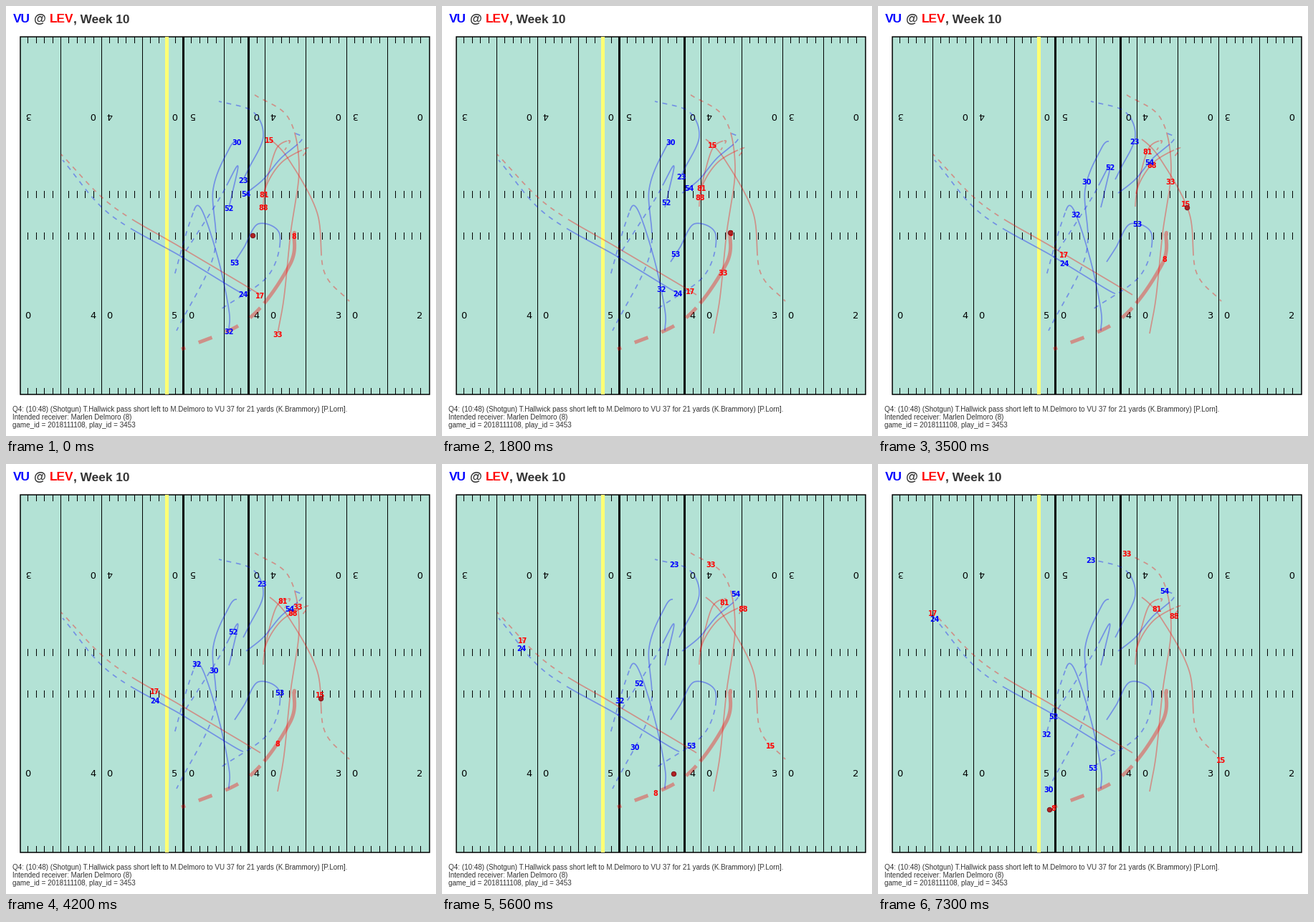
A matplotlib script for the animation above (7400 ms loop, 600 by 600 pixels).

```python
import numpy as np
import matplotlib.pyplot as plt
from matplotlib.animation import FuncAnimation

FRAMES, STEP = 74, 100
SNAP, THROW, LAST = 11, 46, 63   # play starts, routes turn dashed, play ends
LEAD = 0.8                       # frames by which the ball leads its carrier
PX = 0.72                        # points per pixel at 100 dpi
BLUE, RED, GREY = "#0000ff", "#ff0000", "#333333"
LEFT, RIGHT, TOP, BOTTOM = 19.5, 590.5, 43, 542
YARD = 11.4

fig = plt.figure(figsize=(6, 6), dpi=100, facecolor="white")
ax = fig.add_axes([0, 0, 1, 1])
ax.set_xlim(0, 600)
ax.set_ylim(600, 0)
ax.axis("off")


def write(x, y, s, size, color=GREY, font="Liberation Sans", **kw):
    return ax.text(x, y, s, fontsize=size * PX, color=color, family=font, **kw)


def digit(x, y, s, size, turned=False, **kw):
    shift = -0.365 * size if turned else 0.365 * size
    return write(x, y + shift, s, size, font="DejaVu Sans", ha="center",
                 va="baseline", rotation=180 if turned else 0,
                 rotation_mode="anchor", **kw)


def bars(xs, y0, y1, width=1, color="black", z=2):
    """Vertical bars centred on whole pixel columns."""
    ax.vlines(np.floor(xs) + 0.5, y0, y1, colors=color, linewidth=width * PX,
              zorder=z, snap=False)


def draw_field():
    ax.add_patch(plt.Rectangle((LEFT, TOP), RIGHT - LEFT, BOTTOM - TOP,
                               fc="#b3e2d5", ec="black", lw=1.5 * PX, zorder=1))
    marks = np.arange(1, 50)
    bars(LEFT + YARD * marks[marks % 5 == 0], TOP, BOTTOM)
    for y0, y1 in ((TOP, 52), (258, 268), (316, 326), (533, BOTTOM)):
        bars(LEFT + YARD * marks[marks % 5 > 0], y0, y1)
    bars([224], TOP, BOTTOM, 5, "#ffff73", 3)
    bars([247, 338], TOP, BOTTOM, 3, z=3)

    for k, tens in enumerate("345432"):
        mid = LEFT + 10 * YARD * k
        for x, low, high in ((mid - 12, tens, "0"), (mid + 11, "0", tens)):
            if LEFT < x < RIGHT:
                digit(x, 431, low, 13, color="black", zorder=4)
                digit(x, 153.5, high, 13, True, color="black", zorder=4)


def draw_text():
    for x, s, color in ((9.5, "VU", BLUE), (38.5, "@", GREY),
                        (61, "LEV", RED), (94.5, ", Week 10", GREY)):
        write(x, 23, s, 17.3, color, weight="bold")
    lines = ("Q4: (10:48) (Shotgun) T.Hallwick pass short left to M.Delmoro "
             "to VU 37 for 21 yards (K.Brammory) [P.Lorn].",
             "Intended receiver: Marlen Delmoro (8)",
             "game_id = 2018111108, play_id = 3453")
    for i, s in enumerate(lines):
        write(9, 566.3 + 11 * i, s, 9.9)


class Runner:
    """Smooth run through evenly timed points, x + yj, up to the last moment."""

    def __init__(self, number, color, *points, start=SNAP, width=1.7):
        self.p = np.array(points)
        self.start = start
        self.slope = np.gradient(self.p)
        if start:                      # set players begin from rest
            self.slope[0] = 0
        for a, b, style in ((0, THROW, "-"), (THROW + 1, LAST, (0, (4, 4)))):
            z = self.at(np.linspace(a, b, 150))
            ax.plot(z.real, z.imag, color=color, alpha=0.36, lw=width * PX,
                    linestyle=style, solid_capstyle="butt",
                    dash_capstyle="butt", zorder=5)
        self.label = digit(0, 0, number, 9.6, color=color, weight="bold",
                           zorder=6)

    def at(self, t):
        n = len(self.p) - 1
        s = np.maximum(t - self.start, 0) * n / (LAST - self.start)
        i = np.minimum(np.floor(s).astype(int), n - 1)
        u = s - i
        ease = u * u * (3 - 2 * u)
        return (self.p[i] + ease * (self.p[i + 1] - self.p[i])
                + u * (1 - u) ** 2 * self.slope[i]
                - u * u * (1 - u) * self.slope[i + 1])

    def move(self, t):
        z = self.at(t)
        self.label.set_position((z.real, z.imag + 1 + 0.365 * 9.6))


draw_field()
draw_text()

receiver = Runner("8", RED, 402+320j, 402+319j, 396+361j, 338+437j, 245+479j,
                  width=5)
passer = Runner("15", RED, 368+186j, 393+212j, 434+288j, 444+371j, 479+412j)
back = Runner("33", RED, 379+457j, 388+406j, 397+318j, 409+225j, 394+156j,
              347+124j, start=0)
runners = [
    receiver, passer, back,
    Runner("81", RED, 360+262j, 365+239j, 378+198j, 396+188j, 389+201j),
    Runner("88", RED, 359+280j, 364+249j, 386+217j, 421+198j, 413+211j),
    Runner("17", RED, 355+403j, 327+386j, 246+338j, 147+278j, 77+207j),
    Runner("30", BLUE, 322+189j, 312+198j, 289+256j, 290+347j, 238+453j),
    Runner("23", BLUE, 331+242j, 339+226j, 359+182j, 344+147j, 297+133j),
    Runner("54", BLUE, 335+261j, 359+242j, 383+213j, 413+186j, 400+176j),
    Runner("52", BLUE, 311+281j, 316+260j, 323+223j, 297+270j, 245+351j),
    Runner("53", BLUE, 319+357j, 332+337j, 352+304j, 382+319j, 366+376j,
           300+423j),
    Runner("24", BLUE, 331+401j, 317+394j, 247+351j, 144+290j, 79+215j),
    Runner("32", BLUE, 311+453j, 311+424j, 295+349j, 271+281j, 257+300j,
           235+376j, start=0),
]

# the ball rests, is carried by each runner in turn, and flies in between
ball_path = [(0, 343.5+320j), (10, 343.5+320j), (58, 288+450j)]
for runner, first, last in ((receiver, 15, 24), (back, 25, 28),
                            (passer, 32, 49), (receiver, 60, LAST)):
    ball_path += [(t, runner.at(t + LEAD)) for t in range(first, last + 1)]
ball_t, ball_z = zip(*sorted(ball_path, key=lambda step: step[0]))
ball, = ax.plot([], [], "o", ms=6.4 * PX, mfc="#b22222", mec="#7a1018",
                mew=1 * PX, zorder=7)


def draw(frame):
    t = min(frame, LAST)
    for runner in runners:
        runner.move(t)
    z = np.interp(t, ball_t, ball_z)
    ball.set_data([z.real], [z.imag])
    return [runner.label for runner in runners] + [ball]


anim = FuncAnimation(fig, draw, frames=FRAMES, interval=STEP, repeat=True,
                     repeat_delay=0, init_func=lambda: draw(0), blit=False)
plt.show()
```
